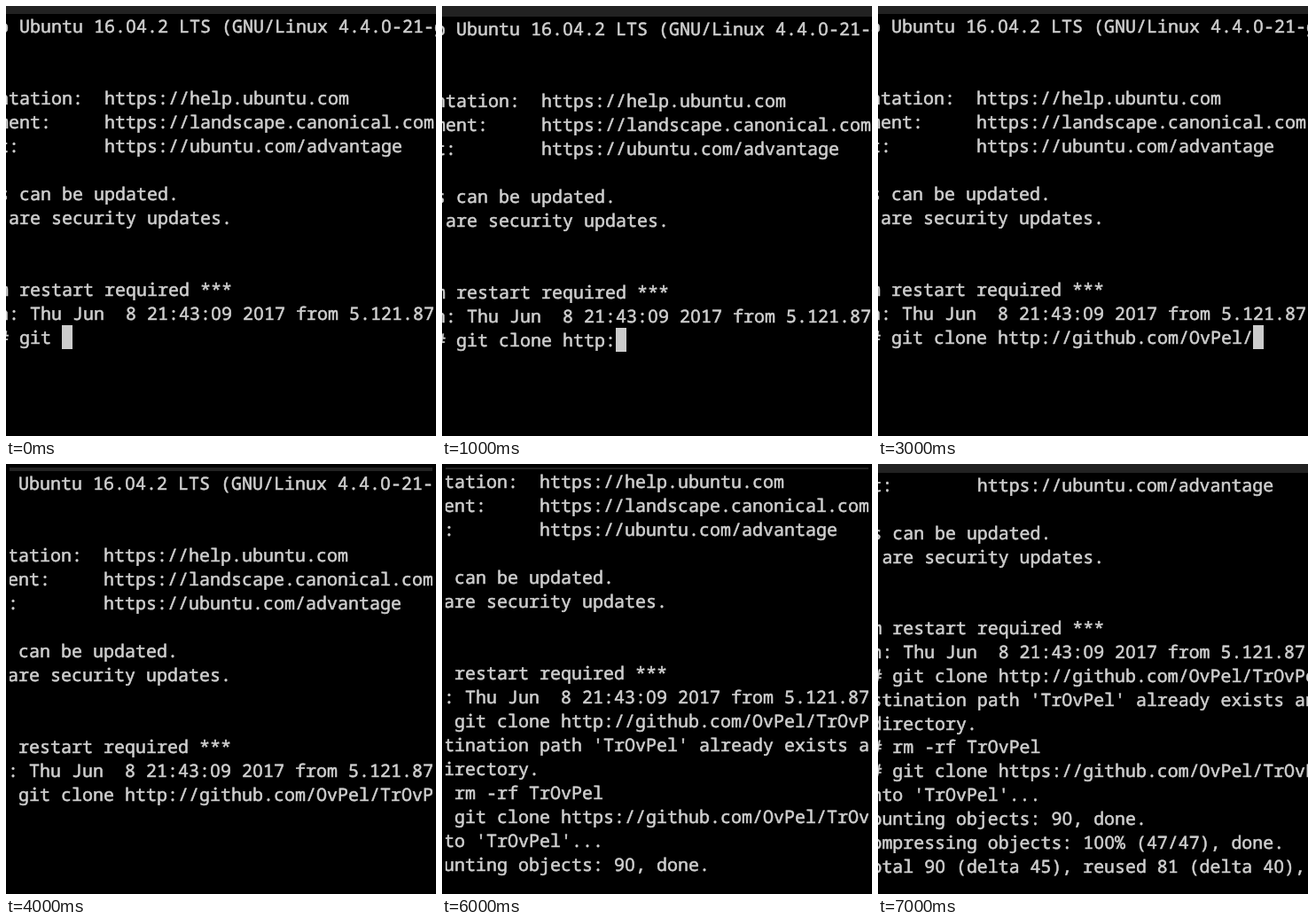
Animation of 485x485 px, one loop 8 s. Source, as an HTML page:

```html
<!DOCTYPE html>
<html lang="en">
<head>
<meta charset="utf-8">
<title>Terminal session</title>
<style>
  html, body { margin: 0; width: 100%; height: 100%; overflow: hidden; background: #000; }
  svg { display: block; width: 485px; height: 485px; }
  text {
    font: 500 20px "Noto Sans Mono", "DejaVu Sans Mono", monospace;
    fill: #d0d0d0; stroke: #d0d0d0; stroke-width: 0.55px;
    white-space: pre; font-variant-ligatures: none; text-rendering: geometricPrecision;
  }
  .zero { font-family: "Noto Sans", sans-serif; }
</style>
</head>
<body>
<svg viewBox="0 0 485 485">
  <defs><clipPath id="edge"><rect id="window"/></clipPath></defs>
  <rect width="485" height="485" fill="#000"/>
  <g clip-path="url(#edge)">
    <g id="camera">
      <g id="screen"></g>
      <rect id="cursor" width="12" height="27" fill="#cccccc"/>
      <rect x="-10" y="-20" width="510" height="29" fill="#222222"/>
    </g>
  </g>
</svg>
<script>
const CELL = 12, ROW = 27, LEFT = -117, TOP = 9, STEP = 1000;
const PROMPT = 'root@vm:~# ';
const CMD_ROW = 13;
const command = 'git clone http://github.com/OvPel/TrOvPel';

const lines = [
  'Welcome to Ubuntu 16.04.2 LTS (GNU/Linux 4.4.0-21-generic x86_64)',
  '',
  '',
  ' * Documentation:  https://help.ubuntu.com',
  ' * Management:     https://landscape.canonical.com',
  ' * Support:        https://ubuntu.com/advantage',
  '',
  '0 packages can be updated.',
  '0 updates are security updates.',
  '',
  '',
  '*** System restart required ***',
  'Last login: Thu Jun  8 21:43:09 2017 from 5.121.87.',
  PROMPT + command,
  "fatal: destination path 'TrOvPel' already exists and is not ",
  'an empty directory.',
  PROMPT + 'rm -rf TrOvPel',
  PROMPT + 'git clone https://github.com/OvPel/TrOvPel',
  "Cloning into 'TrOvPel'...",
  'remote: Counting objects: 90, done.',
  'remote: Compressing objects: 100% (47/47), done.',
  'remote: Total 90 (delta 45), reused 81 (delta 40), pack-reused 0'
];

// typed: command length so far; rows: lines printed; x, y, zoom: camera; inset: black border
const steps = [
  { typed: 4 },
  { typed: 15, x: 1, y: 3 },
  { typed: 27, x: -1, y: -2 },
  { typed: 34 },
  { typed: 41, x: -1, y: -1, inset: 4 },
  { rows: 19, scroll: 2, x: 2.4, y: 4.8, zoom: 0.99 },
  { rows: 20, scroll: 3, x: -1, y: -3, inset: 4 },
  { rows: 22, scroll: 5, x: 1.4, y: 1.1, zoom: 0.995 }
];

const byId = id => document.getElementById(id);
const setAttrs = (el, attrs) => {
  for (const key in attrs) el.setAttribute(key, attrs[key]);
};
const make = (tag, attrs, parent) => {
  const el = document.createElementNS('http://www.w3.org/2000/svg', tag);
  setAttrs(el, attrs);
  parent.appendChild(el);
  return el;
};

const colX = col => LEFT + col * CELL;

// The zero has no slash, so it comes from the proportional face.
function addLine(str, row) {
  const text = make('text', { y: TOP + row * ROW + 21 }, byId('screen'));
  let col = 0;
  for (const part of str.split(/(0)/)) {
    if (!part) continue;
    const zero = part === '0';
    const span = make('tspan', { x: colX(col) + (zero ? 0.3 : 0) }, text);
    if (zero) span.setAttribute('class', 'zero');
    span.textContent = part;
    col += part.length;
  }
}

function draw({ typed, rows = CMD_ROW + 1, scroll = 0, x = 0, y = 0, zoom = 1, inset = 0 }) {
  const typing = typed !== undefined;
  byId('screen').replaceChildren();
  lines.slice(scroll, rows).forEach((line, i) => {
    addLine(typing && i === CMD_ROW ? PROMPT + command.slice(0, typed) : line, i);
  });
  const col = typing ? PROMPT.length + typed : 0;
  const row = typing ? CMD_ROW : rows - scroll;
  setAttrs(byId('cursor'), { x: colX(col), y: TOP + row * ROW });
  setAttrs(byId('camera'), { transform: `translate(${x} ${y}) scale(${zoom})` });
  const size = 485 - 2 * inset;
  setAttrs(byId('window'), { x: inset, y: inset, width: size, height: size });
}

const start = performance.now();
let shown = -1;
function tick() {
  const step = Math.floor((performance.now() - start) / STEP) % steps.length;
  if (step !== shown) draw(steps[shown = step]);
  requestAnimationFrame(tick);
}
tick();
</script>
</body>
</html>
```
